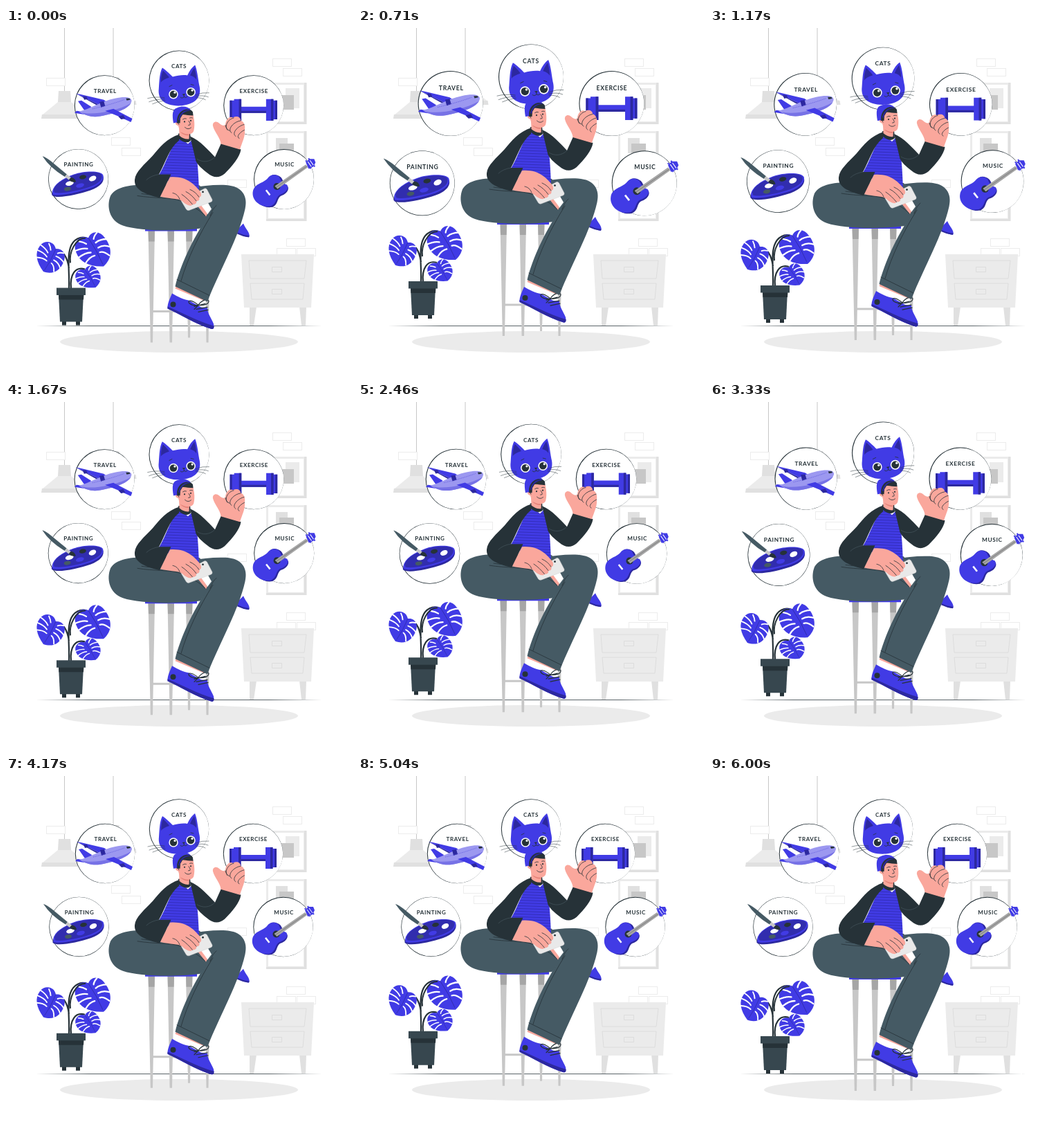
Recreate the animation shown at these times as an HTML page. Size 500x500 px, loop 6.04 s.

```html
<!DOCTYPE html>
<html lang="en">
<head>
<meta charset="utf-8">
<title>Hobbies</title>
<style>
html, body { margin: 0; width: 100%; height: 100%; overflow: hidden; background: #fff; }
svg { display: block; width: 100vw; height: 100vh; }
text { font: 700 8px Lato, "Open Sans", sans-serif; letter-spacing: .6px; text-anchor: middle; fill: #263238; }
.b { fill: #413be5; }
.deep { fill: #2c289f; }
.lilac { fill: #9c98f0; }
.k { fill: #263238; }
.s { fill: #455a64; }
.skin { fill: #faa79c; }
.w { fill: #fff; }
.g1 { fill: #ebebeb; }
.g2 { fill: #e0e0e0; }
.g3 { fill: #c7c7c7; }
.g4 { fill: #a6a6a6; }
.line { fill: none; stroke: #263238; stroke-width: .8; stroke-linecap: round; stroke-linejoin: round; }
.pale { fill: none; stroke: #d9d9d9; stroke-width: .8; }
.brick { fill: #fff; stroke: #ececec; stroke-width: 1; }
.slit { fill: none; stroke: #fff; stroke-width: 2.3; stroke-linecap: round; }
</style>
</head>
<body>
<svg viewBox="0 0 500 500" xmlns="http://www.w3.org/2000/svg">
<defs>
  <pattern id="stripes" width="8" height="4" patternUnits="userSpaceOnUse" patternTransform="rotate(2)">
    <rect width="8" height="4" fill="#413be5"/><rect width="8" height=".9" y="2" fill="#302bb5"/>
  </pattern>
  <g id="lamp">
    <path class="g3" d="M84 0h1V92h-1z"/>
    <path class="g2" d="M76 91H93L94 107H75z"/>
    <path class="g1" d="M75 107H94L117 126H52z"/>
    <path class="g2" d="M52 125H117L118 131H51z"/>
  </g>
  <g id="leaf">
    <path class="b" d="M0 0C-9-9-25-3-25 13C-25 29-13 40 7 46C24 40 29 25 24 9C20-6 7-8 0 0z"/>
    <path class="slit" d="M-26 11Q-14 10-7 14M-24 22Q-12 18-4 21M-17 33Q-8 26 0 27M27 11Q16 7 8 10M27 23Q18 16 9 18M21 34Q15 25 9 25M-15 0Q-9 3-6 7M15-3Q9 0 7 4"/>
    <path d="M0 0Q6 22 7 43" fill="none" stroke="#2c289f" stroke-width=".7"/>
  </g>
</defs>

<g id="room">
  <use href="#lamp"/><use href="#lamp" x="70.5" y="-20"/>
  <g id="bricks"></g>
  <path class="g2" d="M376 79h58.500v60h-58.500z"/><path class="g1" d="M376 79h55v57h-55z"/><path class="w" d="M379 82h51v53h-51z"/>
  <path class="g1" d="M404 87h20v29h-20z"/><path class="g3" d="M397 97h19v21h-19z"/>
  <path class="g2" d="M376 149h58.500v130h-58.500z"/><path class="g1" d="M376 149h55v127h-55z"/><path class="w" d="M379 152h51v123h-51z"/>
  <path class="g2" d="M390 159h17v22h-17z"/><path class="g3" d="M395 167h21v20h-21z"/>
  <path class="g2" d="M352 403h10l-4 27h-6zM424 403h10l-1 27h-6z"/>
  <path class="g1" d="M340 327H445L441 404H344z"/>
  <path class="pale" d="M351 336H434L431 362H353zM353 369H431L429 392H355zM384.500 345.500h14v7h-14zM384.500 377.500h14v7h-14z"/>
  <ellipse class="g1" cx="250" cy="453.500" rx="172" ry="15.500"/>
  <path class="k" d="M43 430.300L120 429.900H380L457 430.300L380 430.800H120z"/>
</g>

<g id="bubbles">
  <g data-bubble="143 112 .5 .3"></g>
  <text x="144" y="94.300">TRAVEL</text>
  <path class="b" d="M102 95L108 96L142 104L152 111L139 113z"/>
  <path class="deep" d="M102 95L139 113L134 113z"/>
  <path class="b" d="M105 106L110 105L124 114L121 120L114 119zM100 123L103 120L121 122L119 126z"/>
  <path class="lilac" d="M106 121C121 118 138 106 158 102C172 99 182 100 182 105.500C181 114 166 121 145 126C130 130 119 129 106 121z"/>
  <path d="M110 122C123 127 160 121 181 109C176 117 163 122 145 126C130 130 119 129 110 122z" fill="#7772e6"/>
  <path class="b" d="M144 120L156 117L183 131L181 136L161 127z"/>
  <path class="deep" d="M163 128l7-2l3 5l-6 1zM136 107l6-1l2 7l-6 2zM112 99l5 0l2 4l-5 1z"/>
  <path d="M126 117Q152 111 171 104" fill="none" stroke="#554fd8" stroke-width=".9" stroke-dasharray="1 1.300"/>
  <path class="k" d="M174 102L179 102L180 104L175 105z"/>

  <g data-bubble="105.5 218 .2 -.2"></g>
  <text x="106" y="199.500">PAINTING</text>
  <path class="deep" d="M68 238C70 227 83 219 99 213C113 208 138 207 141 213C144 221 137 229 123 234C105 240 78 246 69 242C67 241 67 239 68 238z"/>
  <path class="b" d="M68 236C70 225 83 217 99 211C113 206 138 205 141 212C143 219 136 226 123 231C105 237 78 243 69 240z"/>
  <path d="M70 233C73 224 84 218 99 212C114 207 136 206 139 212C141 218 135 224 122 229C105 235 78 240 71 237z" fill="#312dae"/>
  <ellipse class="w" cx="93" cy="224" rx="6" ry="3.200" transform="rotate(-15 93 224)"/>
  <ellipse class="w" cx="126" cy="217" rx="5.500" ry="3.600" transform="rotate(-25 126 217)"/>
  <ellipse class="k" cx="112" cy="215" rx="5" ry="3" transform="rotate(-12 112 215)"/>
  <ellipse class="s" cx="90" cy="232" rx="5" ry="2.800" transform="rotate(-10 90 232)"/>
  <ellipse class="b" cx="108" cy="227" rx="6" ry="3" transform="rotate(-15 108 227)"/>
  <path class="s" d="M54 185Q58 186 66 192L89 211L86 214.500Q65 202 54 185z"/>
  <path class="g3" d="M86 214.500L89 211L95 215.500L92 219z"/>
  <path class="k" d="M92 219L95 215.500Q101 216 102 222Q96 223 92 219z"/>

  <g data-bubble="250 76.500 .5 .1"></g>
  <text x="250" y="58.800">CATS</text>
  <path class="b" d="M221 88C222 75 222 66 226 58C231 61 237 67 241 71C248 69 256 68 262 69C265 62 269 57 273 54C276 61 277 71 279 83C283 98 276 110 254 112.500C230 114 219 104 221 88z"/>
  <path class="deep" d="M224 79C224 72 225 66 227 62C231 66 234 69 236 72C230 74 226 76 224 79zM266 69C268 64 270 61 272 58C274 64 275 70 275 75C273 72 270 70 266 69z"/>
  <circle class="w" cx="242" cy="96" r="6.700"/><circle class="k" cx="242" cy="96" r="5.200"/><circle class="w" cx="244" cy="93.500" r="1.600"/>
  <circle class="w" cx="267" cy="93" r="6.700"/><circle class="k" cx="267" cy="93" r="5.200"/><circle class="w" cx="269" cy="90.500" r="1.600"/>
  <path class="k" d="M254.500 96l4.500-.6l-1.800 2.800z"/>
  <path class="line" d="M257.200 98v2Q254 103 252 100.500M257.200 100Q260 102 262 99.500M236 85l4-2M267 82l4 1"/>
  <path class="line" style="stroke-width:.5" d="M229 101Q216 99 205 102M229 103Q217 103 207 107M230 105Q220 106 212 110M274 97Q284 93 293 94M274 99Q285 97 292 100M274 101Q283 101 288 104"/>

  <g data-bubble="357 112 .5 .3"></g>
  <text x="357.500" y="94.300">EXERCISE</text>
  <path class="b" d="M337 114h40v9h-40z"/><path class="deep" d="M337 120h40v3h-40z"/>
  <path class="b" d="M323 105h7v28h-7zM329 103h10.500v31H329zM375 103h10.500v31H375zM385 105h6v27h-6z"/>
  <path class="deep" d="M323 105h3v28h-3zM336 103h3.500v31H336zM382 103h3.500v31H382zM388 105h3v27h-3z"/>

  <g data-bubble="400.5 218 .45 .4"></g>
  <text x="401.500" y="199.500">MUSIC</text>
  <path class="deep" d="M358 236C360 224 372 224 378 217C382 210 390 210 396 215C400 219 399 224 405 227C410 232 404 240 396 242C390 246 393 254 384 258C370 261 356 249 358 236z"/>
  <path class="b" d="M356 236C358 224 371 224 377 217C382 210 390 211 394 215C396 220 398 224 405 226C409 232 402 238 395 240C388 244 391 252 382 256.500C368 260 354 249 356 236z"/>
  <circle class="k" cx="390.500" cy="228.500" r="5"/>
  <path class="g4" d="M387.500 228L432 197L435 201L391.500 232z"/>
  <path d="M389 230L434 199" fill="none" stroke="#666" stroke-width=".6"/>
  <path class="w" d="M374 234.500l2-1.500l5.500 7l-2 1.500z"/>
  <path class="b" d="M432 194L437 189L444 189L446 194L443 200L436 203z"/>
  <path d="M435 193L440 200M438 191L443 198" fill="none" stroke="#fff" stroke-width="1"/>
  <path d="M433 193l-1-2M437 190l-1-2M438 201l1 2M443 198l2 2" fill="none" stroke="#413be5" stroke-width="2"/>
</g>

<g class="float">
  <path d="M91 377C92 354 88 333 93 318C97 306 108 300 119 305M94 377C92 357 100 345 114 349M91 348C89 334 84 322 72 321" fill="none" stroke="#263238" stroke-width="2.200"/>
  <use href="#leaf" transform="translate(119 304) rotate(-20) scale(.95 1)"/>
  <use href="#leaf" transform="translate(72 320) rotate(38) scale(.84 .8)"/>
  <use href="#leaf" transform="translate(114 350) rotate(-22) scale(.69 .64)"/>
  <path d="M93 340C91 325 100 304 115 304" fill="none" stroke="#263238" stroke-width="2"/>
  <path class="k" d="M81 424h6v6h-6zM101 424h6v6h-6z"/>
  <path d="M76 385H112L110 425H78z" fill="#37474f"/>
  <path class="k" d="M76 385H112.500L112 393H76.500z"/>
  <path d="M73 376H115V386.500H73z" fill="#37474f"/>
</g>

<g class="float">
  <g id="stool">
    <path class="g3" d="M260 293h9.500L266 448h-3zM287 293h8l-2.500 162h-3z"/>
    <path class="g4" d="M260 293h9.500l-.5 16h-8.500z"/>
    <path class="g3" d="M210 408.500H291v3H210zM205.500 293H215L212 455h-3.200zM233.500 293H243L240 455h-3.400z"/>
    <path class="g4" d="M205.500 293H215L214.600 309H206zM233.500 293H243L242.600 309H234z"/>
    <path class="b" d="M201 288H276V294H201z"/>
  </g>
  <path class="b" d="M334 292L343 283C346 291 353 296 351.500 302C349 304 341 300 334 297z"/>
  <path class="deep" d="M335 296Q343 300 351.500 300.500L351 303Q342 302 334 298z"/>

  <path class="w" d="M247 371L288 388L283 406L241 388z"/>
  <path class="skin" d="M247 371L289 389L287 395L244.500 377z"/>
  <path class="b" d="M240 384C248 389 257 393 264 394L282 404L291 405C291 413 297 420 300 428C301 433 300 436 297 435.500C273 428 253 415 233.500 406C233 399 237 391 240 384z"/>
  <path class="deep" d="M233.500 403C255 412 276 424 300.500 431C301 434 300 436 297 435.500C273 428 253 415 233.500 406z"/>
  <circle class="k" cx="241.500" cy="400" r="4"/>
  <path class="line" style="stroke-width:1.200" d="M272 403l16-4M275 407l16-3M278 411l14-3M278 401C270 394 263 393 264 397C266 401 273 402 278 401C282 394 291 391 293 395C293 400 285 402 278 401M278 401l-6 6"/>

  <path class="s" d="M224 227C190 226 160 227 151 243C145 258 149 279 169 286C192 294 246 295 281 290L300 262L280 228z"/>
  <path class="s" d="M226 240C256 234 286 226 318 227.500C341 229 350 243 345.500 262C336 304 311 346 291 396L244.500 374C252 343 270 305 292 272L262 252z"/>
  <path class="w" d="M279 257L289 248L297 262L291 270z"/>
  <path class="skin" d="M277 258L281 255.500L291 269L289 273z"/>
  <path class="line" d="M190 243C214 247 237 245 252 250C268 256 280 264 288 272M299 267C279 299 262 334 253 366M247 364L294 387M304 257Q298 262 295 272M196 240Q215 243 229 241"/>

  <path d="M250 158L263 168L271 160C277 184 278 213 279 235Q249 235 221 213C232 195 238 171 250 158z" fill="url(#stripes)"/>
  <path class="k" d="M266 157C281 163 293 178 302 187L311 167L339.500 176C338 187 327 200 316 211C308 218 299 217 291 210C283 204 277 198 274.500 193z"/>
  <path class="line" style="stroke:#4b5b63;stroke-width:.6" d="M276 190C284 195 294 195 302 187"/>

  <path class="skin" d="M310.500 168C310 159 301 151 299 142C298 136 304 134 308 138C311 141 314 142 317 141C317 134 322 127 328 130C333 127 339 129 339 134C344 136 346 141 345 148C346 157 341 166 338 176z"/>
  <path class="line" d="M320 148C315 142 321 132 329 130.500M326 152C319 148 328 136 339 134.500M332 157C325 153 335 142 344 140M337 160C332 158 338 151 344.500 148M317 141Q318 147 323 149"/>

  <path d="M253 250L287 232.500Q289.500 232 290.500 234L298 248.500Q298.500 251 296 252L264.500 264Q262 264.500 260.500 262.500z" fill="#e9e9e9" stroke="#d2d2d2" stroke-width=".5"/>
  <circle class="k" cx="284.500" cy="237.500" r="1.400"/>
  <path class="skin" d="M237 216L222 244C239 248 249 246 255 251C261 257 268 259 269.500 255.500C274 256 276 253 275 250.500C279 251 280.500 248 279 245C283 244.500 283 240 280 236C272 226 260 214 237 216z"/>
  <path class="line" d="M269.500 255.500C265 250 260 245 254 241M275 250.500C271 245 266 240 260 237M279 245C276 240 271 236 266 234M251 248C249 243 246 240 241 239"/>
  <path class="k" d="M251 154C232 160 222 173 212 185C200 198 187 208 186 220C185 233 198 240 222 246L238.500 212L221 212C231 194 236 174 250 163z"/>
  <path class="line" style="stroke:#4b5b63;stroke-width:.6" d="M221 212C214 213 207 216 203 220"/>

  <path class="k" d="M249 153L266 152L267 163Q261 170 249 160z"/>
  <path class="skin" d="M250 143L265 150L264.500 161Q257 162 250.500 156z"/>
  <path d="M252 151Q258 157 265 155.500V151z" fill="#e58379"/>
  <path class="skin" d="M248 128L269 122C273 132 273 144 271 150C268 156 257 155 251 149L249 142C243 140 244 134 248 134z"/>
  <path class="b" d="M242 138C240 126 240 118 247 116C255 112.500 263 114 267 119C259 120 253 124 250 130L248 138C246 136 244 138 242 138z"/>
  <path class="k" d="M247.500 138C246 129 250 123 255 120C261 116.500 268 118 270 122L270.500 127C263 127 258 125 255 126L252 131L251.500 138z"/>
  <path class="deep" d="M249 133C251 123 258 118 267 119L265 120C257 121 252 126 251 134z"/>
  <circle class="k" cx="258" cy="136" r="1.100"/><circle class="k" cx="267" cy="134.500" r="1.100"/>
  <path class="line" d="M255.500 132.500Q258 130.500 260.500 131.500M265.500 130.500Q267.500 129.500 269.500 130.500M264 135Q267 139 266 140.500L263.500 141M258.500 144Q263 148.500 267.500 144.500M247 137Q249.500 137 250 140"/>
</g>
</svg>
<script>
const PERIOD = 6040, LEAD = 40, FLOATS = 4, LIFT = 10;
const PIVOT = { x: 250, y: 146 };
const BEAT = [[0, 1], [.1, 1.1], [.3, 1], [.4, 1], [.5, 1.1], [.6, 1], [1, 1]];
const bubbles = document.getElementById('bubbles');
const floaters = document.querySelectorAll('.float');

// Each brick is given by its left and top edge.
const bricks = [[385, 44], [400, 58], [58, 72], [152, 158], [167, 173], [320, 219], [405, 304], [391, 318], [420, 318]];
document.getElementById('bricks').innerHTML = bricks
  .map(([x, y]) => `<rect class="brick" x="${x + .5}" y="${y + .5}" width="27" height="11"/>`).join('');

// An off-centre white disc leaves an outline that thins out on one side.
for (const el of document.querySelectorAll('[data-bubble]')) {
  const [x, y, dx, dy] = el.dataset.bubble.split(' ').map(Number);
  el.innerHTML = `<circle class="k" cx="${x}" cy="${y}" r="43.2"/><circle class="w" cx="${x + dx}" cy="${y + dy}" r="42.7"/>`;
}

function tween(keys, p) {
  const i = keys.findIndex(([at]) => at > p);
  const [a, from] = keys[i - 1], [b, to] = keys[i];
  return from + (to - from) * (p - a) / (b - a);
}

function draw(ms) {
  const p = ((ms + LEAD) % PERIOD) / PERIOD;
  const scale = tween(BEAT, p);
  bubbles.setAttribute('transform',
    `translate(${PIVOT.x} ${PIVOT.y}) scale(${scale}) translate(${-PIVOT.x} ${-PIVOT.y})`);
  const rise = LIFT * (1 - Math.abs(1 - 2 * (p * FLOATS % 1)));
  floaters.forEach(el => el.setAttribute('transform', `translate(0 ${-rise})`));
}

const start = performance.now();
function tick() {
  draw(performance.now() - start);
  requestAnimationFrame(tick);
}
tick();
</script>
</body>
</html>
```
